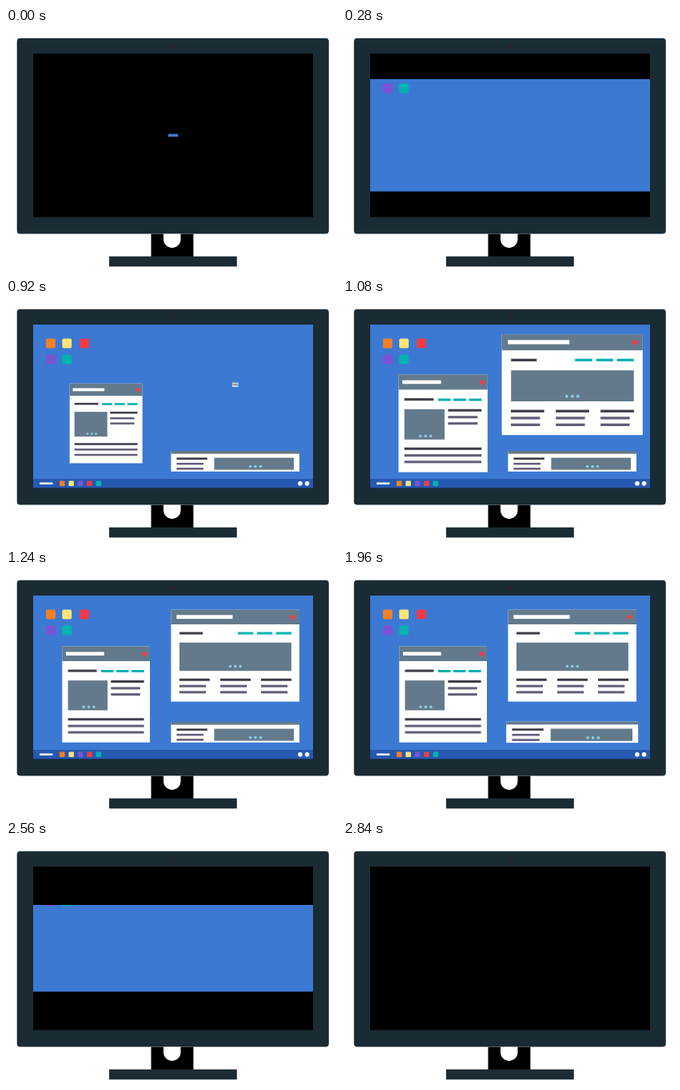
An HTML page for the animation above (3.44 s loop, 414x304 px).

```html
<!DOCTYPE html>
<html lang="en">
<head>
<meta charset="utf-8">
<title>Desktop</title>
<style>
html, body { margin: 0; height: 100%; overflow: hidden; background: #fff; }
svg { display: block; width: 414px; height: 304px; }
</style>
</head>
<body>
<svg id="stage" viewBox="0 0 414 304"></svg>
<script>
const LOOP = 3440, LEAD = 5;
const ORANGE = '#f58025', YELLOW = '#ffe478', RED = '#f23b48', PURPLE = '#7a55d3', TEAL = '#00b3b0';
const BEZEL = '#1a2b34', SLATE = '#637a8c', DARK = '#403d49', MUTED = '#645d78';

// Shapes are given by their edges
const rect = (x1, y1, x2, y2, fill, r = 0) =>
  `<rect x="${x1}" y="${y1}" width="${x2 - x1}" height="${y2 - y1}" rx="${r}" fill="${fill}"/>`;
const dot = (x, y, r, fill) => `<circle cx="${x}" cy="${y}" r="${r}" fill="${fill}"/>`;
const line = (x1, x2, y, fill, h = 3) => rect(x1, y, x2, y + h, fill);
const each = (list, draw) => list.map(draw).join('');
const picture = (x1, y1, x2, y2, dotX, dotY) =>
  rect(x1, y1, x2, y2, SLATE) + each([-6.4, 0, 6.4], dx => dot(dotX + dx, dotY, 1.8, '#8ec9e2'));
const frame = (x1, y1, x2, y2, header) =>
  rect(x1, y1, x2, y2, '#fff') + rect(x1, y1, x2, header, SLATE);

const leftWindow =
  frame(70.3, 95.5, 180, 215.7, 114) +
  line(75, 122.7, 102.5, '#fff', 4.5) + dot(173.3, 105, 2.8, RED) +
  line(77.5, 113.5, 124.6, DARK) +
  each([119, 138, 157.2], x => line(x, x + 15.5, 125, TEAL)) +
  picture(77.5, 138.2, 127, 175.5, 103.5, 171.3) +
  line(131.3, 172.6, 138, DARK) + each([146.4, 154.2], y => line(131.3, 167.8, y, MUTED)) +
  line(77.5, 172.6, 185.3, DARK) + each([193.6, 201.6], y => line(77.5, 172.6, y, MUTED));

const rightWindow =
  frame(206.4, 49.7, 367, 164.6, 68) +
  line(213.3, 283.5, 56.3, '#fff', 4.8) + dot(358, 59, 2.8, RED) +
  line(217, 246.2, 77.6, DARK) +
  each([290, 314, 337.6], x => line(x, x + 19.3, 77.6, TEAL)) +
  picture(217, 90.8, 356.9, 126.2, 286.8, 120.5) +
  each([216.8, 268, 319], x => line(x, x + 38, 135.8, DARK) +
    each([143.7, 151.4], y => line(x, x + 33.2, y, MUTED)));

const bottomWindow =
  frame(206.4, 190, 367, 215.8, 193.6) +
  line(213.4, 251.8, 198.4, DARK, 2.6) +
  each([204.9, 211.1], y => line(213.4, 247, y, MUTED, 2.5)) +
  picture(260.4, 198.6, 360, 213.6, 312, 209.6);

// Timing in ms: opening and closing start, their duration; s is the overshoot
const windows = [
  { art: leftWindow, cx: 125.1, cy: 155.6, opens: 857, closes: 2066, time: 250, s: 1.70158 },
  { art: rightWindow, cx: 286.7, cy: 107.2, opens: 918, closes: 2177, time: 300, s: 1.70158 },
  { art: bottomWindow, cx: 286.7, cy: 203, opens: 590, closes: 1922, time: 300, s: 2 }
];

const icons = [[50, 49.5, ORANGE], [70.3, 49.5, YELLOW], [92.2, 49.5, RED], [50, 69.6, PURPLE], [70.3, 69.6, TEAL]];
const stage = document.getElementById('stage');
stage.innerHTML =
  `<clipPath id="lit"><rect id="opening"/></clipPath>` +
  rect(13.7, 12.7, 403.8, 257.6, BEZEL, 4) + dot(209, 22.5, 2.8, '#29252c') +
  rect(34, 32, 384, 236.5, '#000') +
  rect(181.5, 257.6, 234.4, 286, '#000') +
  `<path d="M197 257.6v6.6a10.75 10.75 0 0 0 21.5 0v-6.6z" fill="#fff"/>` +
  rect(129, 285.7, 288.8, 298.4, BEZEL) +
  `<g clip-path="url(#lit)">` +
  rect(34, 32, 384, 236.5, '#3c79d3') +
  each(icons, ([x, y, fill]) => rect(x, y, x + 11.8, y + 12, fill, 2)) +
  rect(34, 225, 384, 236.5, '#2659b0') +
  line(42, 58.4, 229.5, '#fff', 2.5) +
  each([ORANGE, YELLOW, PURPLE, RED, TEAL], (fill, i) =>
    rect(67 + i * 11.4, 227.5, 73.5 + i * 11.4, 234, fill, 1)) +
  dot(368, 230.8, 2.8, '#fff') + dot(376.6, 230.8, 2.8, '#fff') +
  each(windows, w => `<g class="window">${w.art}</g>`) +
  `</g>`;

const opening = document.getElementById('opening');
const groups = stage.querySelectorAll('.window');
const ramp = (t, start, time) => Math.min(1, Math.max(0, (t - start) / time));
const back = (p, s) => p * p * ((s + 1) * p - s);

function draw(now) {
  const t = (now + LEAD) % LOOP - LEAD;

  // The screen opens sideways, then upright, and closes the other way round
  const wide = ramp(t, -LEAD, 170) - ramp(t, 2650, 170);
  const tall = ramp(t, 165, 170) - ramp(t, 2480, 170);
  const w = 350 * wide, h = 3.5 + 201 * tall;
  const box = { x: 209 - w / 2, y: 134.25 - h / 2, width: w, height: h };
  for (const name in box) opening.setAttribute(name, box[name]);

  windows.forEach(({ cx, cy, opens, closes, time, s }, i) => {
    const hidden = t < closes ? 1 - ramp(t, opens, time) : ramp(t, closes, time);
    const scale = 1 - back(hidden, s);
    groups[i].setAttribute('transform', `translate(${cx} ${cy}) scale(${scale}) translate(${-cx} ${-cy})`);
  });
}

const start = performance.now();
function tick() {
  draw(performance.now() - start);
  requestAnimationFrame(tick);
}
tick();
</script>
</body>
</html>
```
